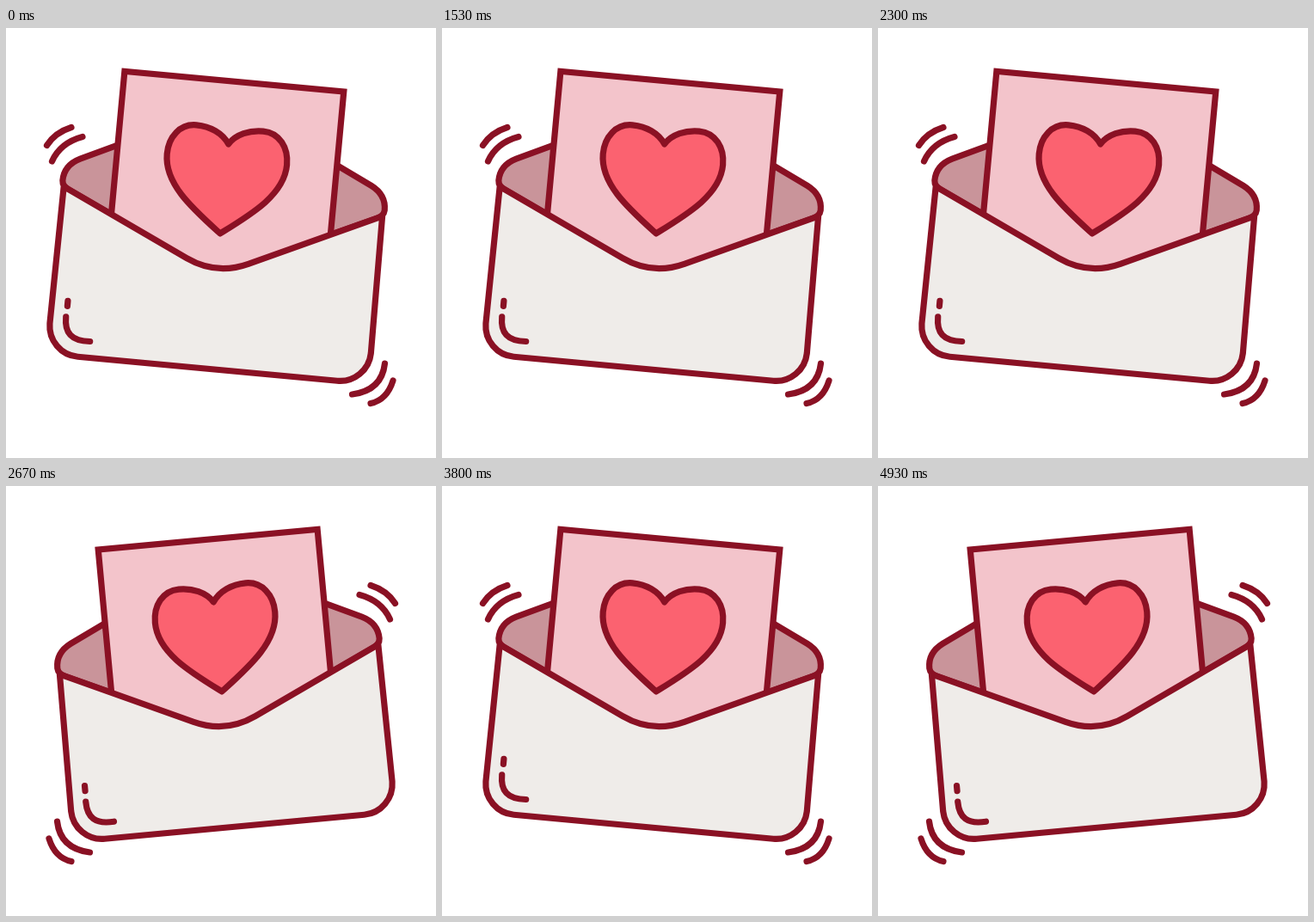
Recreate the animation shown at these times as an HTML page. Size 500 px wide and 500 px high, loop 5310 ms.

```html
<!DOCTYPE html>
<html lang="en">
<head>
<meta charset="utf-8">
<title>Wobbling love letter</title>
<style>
  html, body { margin: 0; width: 100%; height: 100%; overflow: hidden; background: #fff; }
  svg {
    display: block; width: 100%; height: 100%;
    fill: none; stroke: #8a1124; stroke-width: 7.2; stroke-linecap: round;
    --side: 1;
  }
  .envelope { transform: rotate(calc(5.3deg * var(--side))); }
  .shake { transform: scaleX(var(--side)); }
  .back { fill: #c9949a; }
  .letter { fill: #f3c4cb; }
  .heart { fill: #fb6270; stroke-linejoin: round; }
  .front { fill: #efece9; stroke-linejoin: round; }
</style>
</head>
<body>
<svg viewBox="0 0 500 500">
  <g transform="translate(250 227.5)">
    <g class="envelope">
      <path id="flap" class="back" d="M-128 -80L-170 -60Q-188 -51 -188 -33Q-188 -26 -177 -21.5L-100 14V-80"/>
      <use href="#flap" transform="scale(-1 1)"/>
      <rect class="letter" x="-128" y="-166" width="256" height="226"/>
      <path class="heart" d="M0 -93C-8 -105 -23 -111.500 -39 -111.500C-58 -111.500 -70 -95 -70 -75C-70 -40 -34 -14 0 11.500
        C34 -14 70 -40 70 -75C70 -95 58 -111.500 39 -111.500C23 -111.500 8 -105 0 -93Z"/>
      <path class="front" d="M-186 -26L-36 43.700Q0 60.400 36 43.700L186 -26L187.500 134
        a36 36 0 0 1 -36 35.500h-303a36 36 0 0 1 -36 -35.500Z"/>
      <path d="M-169 106v6M-169.500 124.500C-169.500 143 -161 152 -139 150.500"/>
    </g>
    <g class="shake">
      <path d="M-202.500 -91Q-193 -106 -174 -112M-196.500 -72.500Q-187 -94 -161 -101
        M190.500 162.500Q187 194 152.500 198.500M200 182.500Q193 205 174 209"/>
    </g>
  </g>
</svg>
<script>
  const LOOP = 5310;
  const LEFT_HOLD = 400;
  const rightHolds = [370, 360, 370, 370, 330, 370, 360];
  const svg = document.querySelector("svg");

  // 1 leans right, -1 leans left; each lean to the right is followed by one to the left.
  function sideAt(time) {
    for (const hold of rightHolds) {
      if (time < hold) return 1;
      time -= hold + LEFT_HOLD;
      if (time < 0) return -1;
    }
    return -1;
  }

  function draw() {
    svg.style.setProperty("--side", sideAt(performance.now() % LOOP));
    requestAnimationFrame(draw);
  }
  draw();
</script>
</body>
</html>
```
